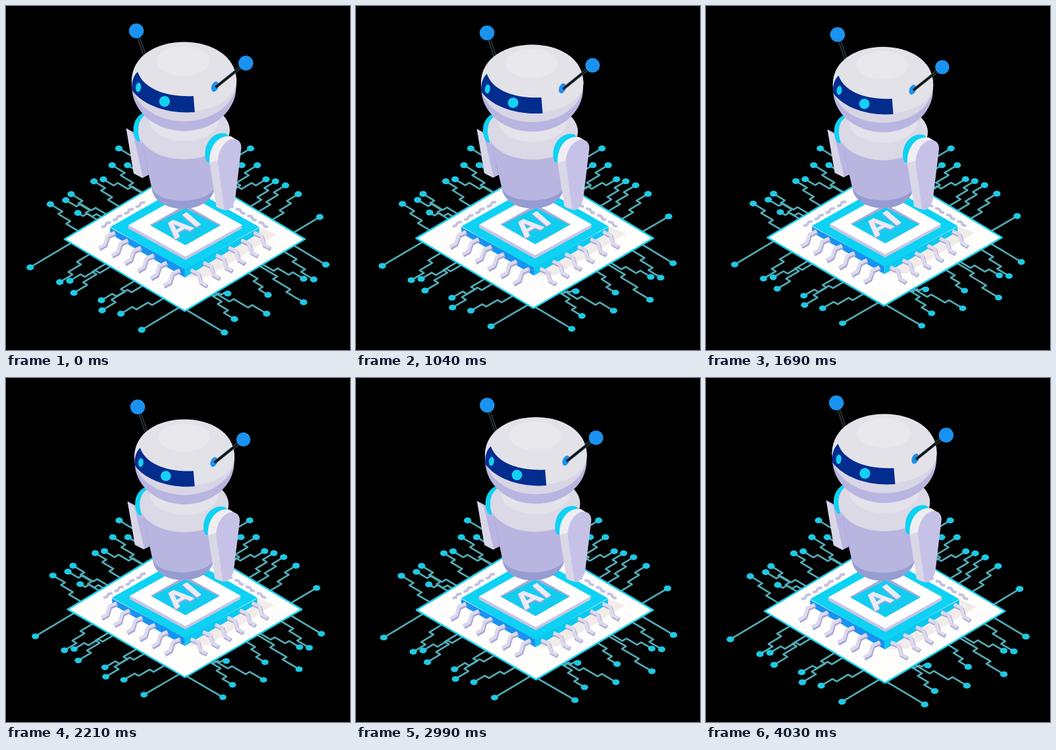
Recreate the animation shown at these times as an HTML page with a canvas. Size 512 by 512 pixels, loop 4.16 s.

```html
<!DOCTYPE html>
<html>
<head>
<meta charset="utf-8">
<style>
html, body { margin: 0; width: 100%; height: 100%; overflow: hidden; background: #000; }
canvas { display: block; }
</style>
</head>
<body>
<canvas id="c" width="512" height="512"></canvas>
<script>
const g = document.getElementById('c').getContext('2d');
const LOOP = 4160, STEP = 130;
const CYAN = '#0dd2f3', BLUE = '#1a92f0', LILAC = '#b9b5e1', PALE = '#dbd9e5';

// k: tilt (0 to -2), s: sideways swing (-1 to 1); each layer shifts by its depth
let k = 0, s = 0, warp;
const layers = {
  board: (x, y) => [
    x + k * (x - 266) * .00007 * (y - 150) - s * 2.5 * (y - 347) / 137,
    y + k * 5.5 * (Math.max(0, y - 212) / 274) ** 2],
  body: (x, y) => [
    x + k * (x - 265) * .015 - s * 1.7 * (300 - y) / 110,
    y + k * (.5 - 2.5 * (300 - y) / 140)],
  leftArm: (x, y) => [x - k, y + k * (.5 - 1.5 * (256 - y) / 80)],
  rightArm: (x, y) => [x + k * 1.3 - s * 1.6, y + k * (.5 - 1.5 * (304 - y) / 114)],
  antenna: (x, y) => [x - k, y - k * 3],
  head: (x, y) => [
    x + k * (x - 266) * .023 - s * 2.8,
    y - k * (1 + 3 * (186 - y) / 133)]
};

// Paths are written with "x y" pairs, each moved by the current layer
const shape = d => new Path2D(d.replace(/(-?[\d.]+) (-?[\d.]+)/g,
  (_, x, y) => warp(+x, +y).map(n => n.toFixed(2)).join(' ')));
const fill = (color, d) => { g.fillStyle = color; g.fill(shape(d)); };
const line = (color, width, d) => {
  g.strokeStyle = color;
  g.lineWidth = width;
  g.stroke(shape(d));
};
const poly = pts => 'M' + pts.map(p => p.join(' ')).join('L');
const diamond = (x, y, rx, ry) => poly([[x - rx, y], [x, y - ry], [x + rx, y], [x, y + ry]]) + 'Z';
const oval = (color, x, y, rx, ry = rx, turn = 0) => {
  const a = warp(x - rx, y), b = warp(x + rx, y), t = warp(x, y - ry), u = warp(x, y + ry);
  g.fillStyle = color;
  g.beginPath();
  g.ellipse((a[0] + b[0]) / 2, (t[1] + u[1]) / 2, (b[0] - a[0]) / 2, (u[1] - t[1]) / 2, turn, 0, 7);
  g.fill();
};

// Circuit ends: the upper ones are mirrored, the others stand alone
const upper = [[168, 212], [158, 237], [181, 237], [131, 261], [145, 258], [97, 280]];
const nodes = [
  ...upper, ...upper.map(([x, y]) => [532 - x, y]),
  [89, 289], [66, 295], [107, 308], [416, 267], [467, 314],
  [36, 389], [80, 411], [95, 409], [101, 427], [142, 438], [143, 453], [171, 458], [202, 482],
  [325, 486], [340, 466], [388, 458], [390, 430], [330, 428], [443, 441], [443, 406], [458, 407], [476, 385]
];
const iso = ([u, v]) => [266 + 89.5 * (u - v), 347 + 53.5 * (u + v)];

// Each trace climbs to the nearest board edge in steps, jogging sideways twice
function drawTrace([x, y], i) {
  const p = (x - 266) / 179, q = (y - 347) / 107, at = [p + q, q - p];
  const axis = Math.abs(at[0]) > Math.abs(at[1]) ? 0 : 1;
  const run = (at[axis] - Math.sign(at[axis])) / 3;
  const jog = (i % 2 ? .07 : -.07) * (Math.abs(at[1 - axis]) < .8);
  const pts = [[x, y]];
  for (let n = 0; n < 3; n++) {
    at[axis] -= run;
    pts.push(iso(at));
    if (n < 2) at[1 - axis] += jog;
    pts.push(iso(at));
  }
  line('#52adb6', 2.6, poly(pts));
  oval('#1fc9e4', x, y, 5.6, 4.4);
}

function leg(x, y, dir) {
  const pts = [[0, 0], [-11, 5], [-15, 18], [-24, 23]];
  const at = (dx, dy) => poly(pts.map(([a, b]) => [x + dir * a + dx, y + b + dy]));
  line('#a9a6d3', 6, at(1, 2));
  line('#dcd9ed', 5, at(0, 0));
}

function drawBoard() {
  warp = layers.board;
  nodes.forEach(drawTrace);
  const edge = diamond(266, 347, 179, 107);
  fill('#fffefd', edge);
  line('#19d2ee', 2.5, edge);
  fill('#f1ece9', 'M370 326L403 340L300 403L266 404Z');
  for (let i = 0; i < 4; i++) for (const dir of [-1, 1]) {
    const x = 266 + dir * (110 - i * 17), y = 322 - i * 10;
    line('#c4c1df', 4, poly([[x, y], [x + dir * 6, y + 1], [x + dir * 9, y + 6], [x + dir * 14, y + 7]]));
  }
  fill(BLUE, 'M155 330L266 391L266 404L155 339Z');
  fill('#0cc8f0', 'M377 330L266 391L266 404L377 338Z');
  fill(CYAN, diamond(266, 329, 111, 63));
  for (let i = 0; i < 6; i++) {
    leg(162 + i * 19.3, 337 + i * 11.2, 1);
    leg(369 - i * 18.8, 337 + i * 11.2, -1);
  }
  fill('#c8c5e4', 'M182 326L351 326L351 331L267 378L182 331Z');
  fill('#fff', diamond(267, 326, 84.5, 47));
  fill('#aaa9d5', diamond(267, 326, 53, 30));
  fill('#12cdf0', 'M216 327L267 301L318 327L267 356Z');
  drawLabel(...warp(251, 347));
}

function drawLabel(x, y) {
  g.font = 'bold 43px "Liberation Sans", Arial, sans-serif';
  for (const [color, drop] of [['#9fa5d6', 2], ['#eceaf5', 0]]) {
    g.setTransform(.96, -.55, .7, .6, x, y + drop);
    g.fillStyle = g.strokeStyle = color;
    g.lineWidth = 1;
    g.fillText('AI', 0, 0);
    g.strokeText('AI', 0, 0);
  }
  g.resetTransform();
}

function drawBody() {
  warp = layers.leftArm;
  fill(LILAC, 'M179 182L198 192L216 220L217 249L203 256L190 249Z');
  fill('#d9d6e8', 'M179 182L189 190L204 256L190 249Z');

  warp = layers.body;
  fill(CYAN, 'M206 158C188 165 185 190 196 202L215 200L215 160Z');
  fill(PALE, 'M208 162C195 169 194 190 202 206L220 200L220 160Z');
  fill('#969dd2', 'M200 195L217 272C222 312 307 313 311 268L330 195Z');
  fill(LILAC, 'M199 190L217 270C224 297 306 297 312 266L332 190Z');
  oval(PALE, 265, 185, 68, 43);
  oval('#e4e2ea', 265, 170, 52, 31);

  warp = layers.rightArm;
  fill(CYAN, 'M328 190C306 185 291 210 298 231L308 236L334 197Z');
  fill('#efeef3', 'M335 194C314 191 301 212 303 235L318 236L346 201Z');
  fill('#dad7e7', 'M303 233L317 229L332 303Q326 306 313 299Z');
  fill('#c6c2e7', 'M315 232C316 211 328 199 337 198C347 198 351 204 350 213L341 288C338 301 330 305 325 304Z');
}

function antenna(x1, y1, x2, y2) {
  const d = poly([[x1, y1], [x2, y2]]);
  line('#42565b', 4.6, d);
  line('#0b1015', 2.8, d);
  oval(BLUE, x2, y2, 11);
}

function drawHead() {
  warp = layers.antenna;
  antenna(208, 78, 194, 37);

  warp = layers.head;
  oval(LILAC, 265, 121, 77.5, 65);
  oval('#d8d6e4', 265, 113, 78, 58.5);
  fill('#e3e2e9', 'M187 112C187 34 343 34 343 112C340 172 194 172 187 112Z');
  oval('#e9e8ec', 264, 82, 40, 22);
  fill('#032c8f', 'M196 98C204 122 236 136 279 134L281 158C245 161 206 150 188 126C186 116 189 104 196 98Z');
  oval('#14d0f2', 197, 121, 4, 7, .1);
  oval('#14d0f2', 236, 142, 8);
  oval(BLUE, 311, 120, 5, 8, .4);
  antenna(312, 121, 357, 85);
}

function draw(now) {
  const phase = Math.floor(now % LOOP / STEP) * STEP / LOOP * 2 * Math.PI;
  k = Math.cos(phase) - 1;
  s = Math.sin(phase);
  g.fillStyle = '#000';
  g.fillRect(0, 0, 512, 512);
  g.lineJoin = 'round';
  drawBoard();
  drawBody();
  drawHead();
}

const start = performance.now();
function tick() {
  draw(performance.now() - start);
  requestAnimationFrame(tick);
}
tick();
</script>
</body>
</html>
```
